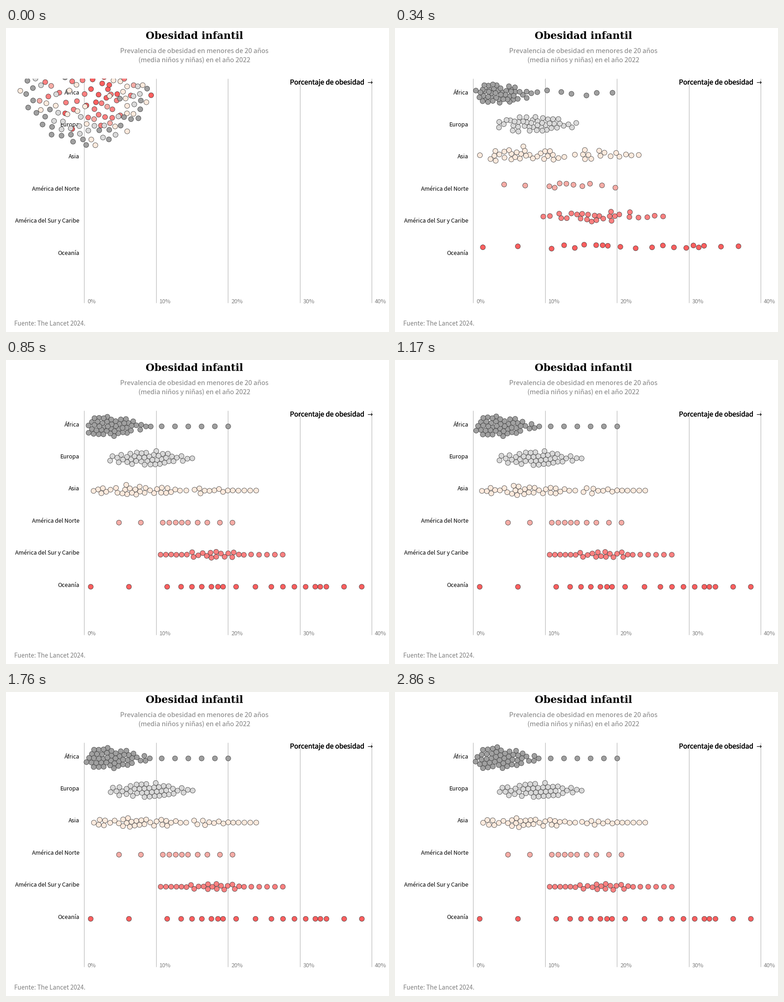
Write a matplotlib script that moves like this. It is 839 by 667 pixels and loops after 2.89 s.

```python
import numpy as np
import matplotlib.pyplot as plt
from matplotlib.animation import FuncAnimation
from matplotlib.patches import Rectangle
from matplotlib.patheffects import withStroke

W, H, DPI = 839, 667, 100
LOOP, STEP = 2890, 17
PT = 72 / DPI                      # points per pixel
ZOOM = 1.1                         # layout units to pixels
X0, Y0, PCT = 172, 110.5, 15.74    # plot origin, pixels per percent
ROW, FIRST = 64, 32                # row spacing in layout units
RADIUS = 5
GREY = "#808080"
SANS, SERIF = "Noto Sans CJK JP", "DejaVu Serif"

# Name, colour, number of countries, evenly spaced quantiles in percent
REGIONS = [
    ("África", "#a0a0a0", 54, [0.9, 1.9, 2.4, 3, 3.7, 4.5, 5.4, 6.3, 9.1, 20]),
    ("Europa", "#d9d9d9", 43, [3.75, 5.9, 7.2, 8.5, 9.6, 10.6, 11.8, 14.9]),
    ("Asia", "#feeadd", 45,
     [1.4, 3, 5.5, 6.2, 7.5, 9.1, 11, 12.4, 15.9, 18, 20.6, 23.9]),
    ("América del Norte", "#f6aca6", 11, [4.8, 10.9, 12.7, 14.4, 17.1, 20.6]),
    ("América del Sur y Caribe", "#fe8080", 27,
     [10.6, 14.4, 17.2, 19.2, 21.9, 27.6]),
    ("Oceanía", "#fe5f5f", 20,
     [0.86, 12.1, 15.3, 18.1, 19.6, 25.3, 28.7, 32, 33.4, 38.6]),
]


def spread(n, quantiles):
    return np.interp(np.linspace(0, 1, n),
                     np.linspace(0, 1, len(quantiles)), quantiles)


def simulate(goal, ticks, pull=0.12, friction=0.6, cooling=0.02276):
    """Force layout: pull to goal plus circle collision, one state per tick."""
    n = len(goal)
    i = np.arange(n)
    r, a = 10 * np.sqrt(0.5 + i), i * np.pi * (3 - np.sqrt(5))
    pos = np.column_stack([r * np.cos(a), r * np.sin(a)])
    vel = np.zeros_like(pos)
    states, alpha = [pos.copy()], 1.0
    for _ in range(ticks):
        alpha *= 1 - cooling
        vel += (goal - pos) * pull * alpha
        for k in range(n - 1):
            gap = pos[k] + vel[k] - pos[k + 1:] - vel[k + 1:]
            dist = np.hypot(gap[:, 0], gap[:, 1])
            hit = np.flatnonzero(dist < 2 * RADIUS)
            if hit.size:
                d = np.maximum(dist[hit], 1e-6)
                push = gap[hit] * ((2 * RADIUS - d) / d / 2)[:, None]
                vel[k] += push.sum(axis=0)
                vel[k + 1 + hit] -= push
        vel *= friction
        pos = pos + vel
        states.append(pos.copy())
    return states


def tick_at(ms):
    if ms < 80:
        return 1
    return int(np.interp(ms, [80, 210, 570, 2860], [2, 9, 24, 118]))


# Highest values first: they start in the middle of the spiral.
nodes = sorted(((v, row, color)
                for row, (_, color, n, q) in enumerate(REGIONS)
                for v in spread(n, q)), key=lambda d: -d[0])
goal = np.array([(v * PCT / ZOOM, FIRST + ROW * row) for v, row, _ in nodes])
states = [s * ZOOM + (X0, Y0) for s in simulate(goal, 118)]

fig = plt.figure(figsize=(W / DPI, H / DPI), dpi=DPI, facecolor="white")
ax = fig.add_axes([0, 0, 1, 1])
ax.set(xlim=(0, W), ylim=(H, 0))
ax.axis("off")


def label(x, y, s, size, color="black", ha="left", family=SANS, **kw):
    return ax.text(x, y, s, fontsize=size * PT, color=color, ha=ha,
                   va="baseline", family=family, zorder=2, **kw)


label(412.5, 24, "Obesidad infantil", 22.1, ha="center", family=SERIF,
      weight="bold")
label(412.5, 55, "Prevalencia de obesidad en menores de 20 años", 14.55, GREY,
      "center")
label(412.5, 75, "(media niños y niñas) en el año 2022", 14.55, GREY, "center")
title = label(622, 124, "Porcentaje de obesidad", 14.8)
title.set_path_effects([withStroke(linewidth=0.4 * PT, foreground="black")])
label(802.5, 124, "→", 14, ha="right", family="DejaVu Sans")
label(18, 653, "Fuente: The Lancet 2024.", 13.4, GREY)

for p in range(0, 41, 10):
    x = X0 + p * PCT
    ax.plot([x - 0.6] * 2, [111, 603], color="#b4b4b4", lw=1.1 * PT, zorder=1,
            solid_capstyle="butt")
    label(x + 6.5, 603.5, f"{p}%", 12.4, GREY)

for row, (name, *_) in enumerate(REGIONS):
    label(161, 145.5 + row * ROW * ZOOM, name, 12.45, ha="right")

dots = ax.scatter(*states[1].T, s=(2 * RADIUS * ZOOM * PT) ** 2,
                  c=[color for _, _, color in nodes], edgecolors="#303030",
                  linewidths=0.75 * PT, zorder=3)
dots.set_clip_path(Rectangle((0, Y0), W, H - Y0, transform=ax.transData))


def update(i):
    dots.set_offsets(states[tick_at((i + 0.5) * STEP)])
    return (dots,)


anim = FuncAnimation(fig, update, frames=LOOP // STEP, interval=STEP,
                     repeat=True, repeat_delay=0, blit=False)
plt.show()
```
